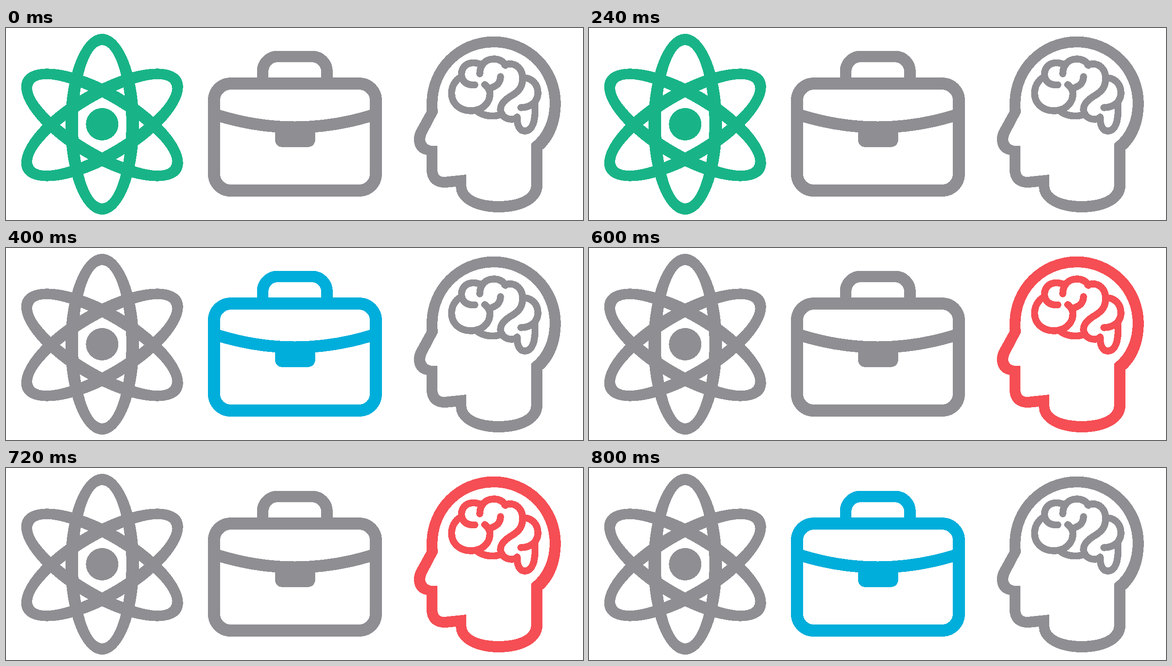
An HTML page that plays this animation: 1280x427 px, repeating every 1 s.

```html
<!DOCTYPE html>
<html lang="en">
<head>
<meta charset="utf-8">
<title>Atom, briefcase, mind</title>
<style>
  html, body { margin: 0; height: 100%; overflow: hidden; background: #fff; }
  svg { display: block; width: 100%; height: 100%; shape-rendering: crispEdges; }
  g { fill: none; stroke: currentColor; color: #8f8e93; }
  .solid { fill: currentColor; stroke: none; fill-rule: evenodd; }
</style>
</head>
<body>
<svg viewBox="0 0 1280 427">
  <defs>
    <path id="orbit" d="M0-201A81.5 201 0 0 1 0 201A81.5 201 0 0 1 0-201Z
      M0-176A53.5 176 0 0 1 0 176A53.5 176 0 0 1 0-176Z"/>
  </defs>

  <g id="atom" class="solid">
    <use href="#orbit" transform="translate(213.3 214)"/>
    <use href="#orbit" transform="translate(213.3 215.5) rotate(59.3) scale(1 1.01)"/>
    <use href="#orbit" transform="translate(213.3 215.5) rotate(-59.3) scale(1 1.01)"/>
    <circle cx="213.3" cy="214" r="36"/>
  </g>

  <g id="case" stroke-width="27">
    <rect x="461.5" y="123.7" width="359" height="237.8" rx="37"/>
    <path stroke-width="25.6" d="M569.4 118V97A33 33.6 0 0 1 602.4 63.4H679A33 33.6 0 0 1 712 97V118"/>
    <path stroke-width="26.5" d="M462 191.8L475 195.8Q641 245.8 807 195.8L820 191.8"/>
    <path class="solid" d="M596.5 222H686V246Q686 265 667 265H615.5Q596.5 265 596.5 246Z"/>
  </g>

  <g id="head" stroke-width="15.5" stroke-linecap="round" stroke-linejoin="round">
    <path class="solid" d="
      M1082 18.6A148.8 148.8 0 0 1 1230.8 167.4C1231 210 1216 248 1190 271V350
      C1190 387 1148 410 1093 410C1040 410 998 387 998 353L975 355
      C949 356 933 340 933 316V282C916 280 905 267 905 247
      C905 239 907 232 911 225L933 185V167.4A148.8 148.8 0 0 1 1082 18.6Z
      M1082 43C1151 43 1206 98 1206 167C1206 205 1191 238 1165 257V350
      C1165 372 1135 385 1093 385C1050 385 1021 372 1021 350V326L973 331
      C962 332 957 326 957 315V262L944 262C935 261 930 255 930 247
      C930 242 932 238 934 234L958 188Q957 175 957.5 163C959 97 1012 43 1082 43Z"/>
    <!-- front lobes -->
    <path d="M1009 109C995 117 988.5 131 988.5 145C988.5 168 1007 184 1031 184
      C1056 184 1073.5 168 1073.5 146C1073.5 138 1069 131 1062 126"/>
    <path d="M1070 135C1086 131 1097 124 1097 108"/>
    <path d="M1040 126.5C1022 128 1010.5 118 1010.5 103C1010.5 88 1021 77.5 1036 77.5Q1046 77.5 1053 81"/>
    <path d="M1051 102C1051 83 1063 69 1082 69Q1100 69 1108 83"/>
    <!-- middle and rear lobes -->
    <path d="M1106 82Q1114 79 1122 80C1137 83 1146 95 1146 112C1146 131 1138 140 1124 149
      C1109 158 1097 167 1097 182C1098 196 1110 203 1122 203Q1130 203 1134 198"/>
    <path d="M1044 184C1056 194 1072 197 1088 195Q1095 194 1100 190"/>
    <path d="M1150 111C1168 112 1180 126 1180 144C1180 164 1164 177 1142 177"/>
    <path d="M1173.5 168V190C1172 217 1163 229 1151 229C1139 229 1133 215 1134 198"/>
  </g>
</svg>
<script>
  const grey = '#8f8e93';
  const icons = [['atom', '#18b487'], ['case', '#00aedb'], ['head', '#f54e54']];
  // Which icon is lit in each fifth of the one-second loop
  const order = [0, 0, 1, 2, 1];

  function draw(now) {
    const lit = order[Math.floor(now % 1000 / 200)];
    icons.forEach(([id, color], i) => {
      document.getElementById(id).style.color = i === lit ? color : grey;
    });
    requestAnimationFrame(draw);
  }
  draw(performance.now());
</script>
</body>
</html>
```
